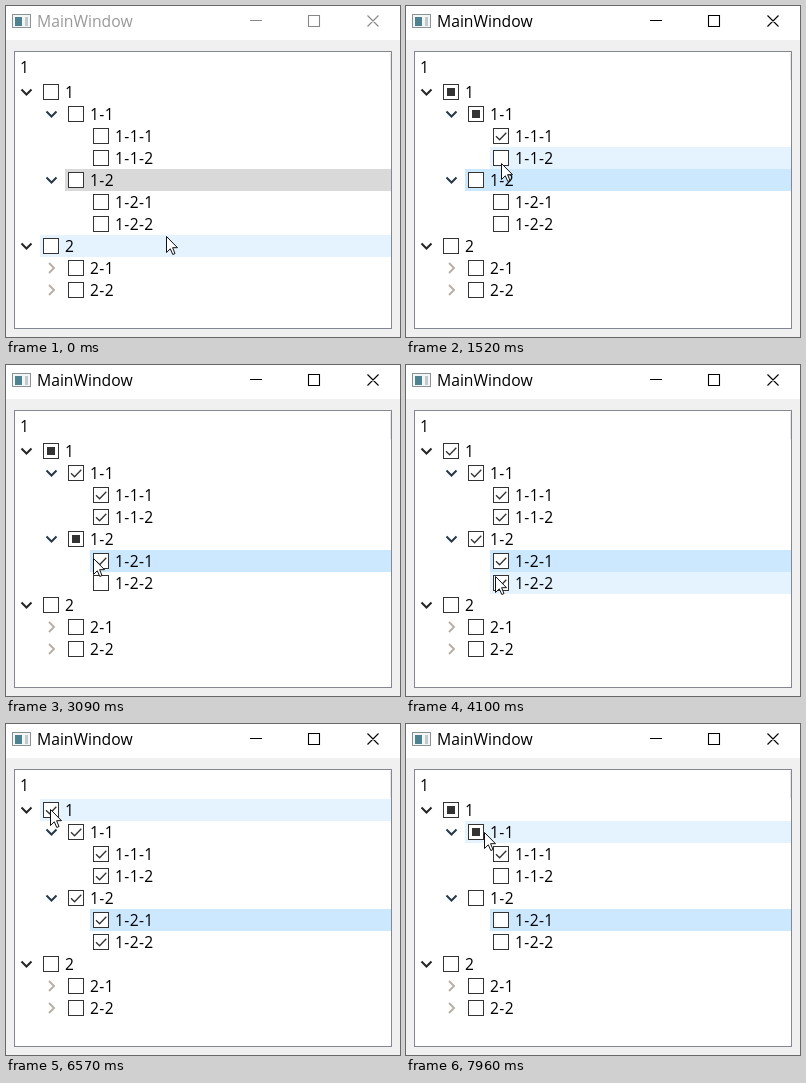
An HTML page that plays this animation: 394x331 px, repeating every 8 s.

```html
<!DOCTYPE html>
<html lang="en">
<head>
<meta charset="utf-8">
<title>Tree view</title>
<style>
html, body { margin: 0; width: 100%; height: 100%; overflow: hidden; }
svg { display: block; }
text { font-family: "Open Sans", "Noto Sans", sans-serif; white-space: pre; }
.label { font-size: 15.6px; letter-spacing: .35px; fill: #000; }
.line { fill: none; }
</style>
</head>
<body>
<svg id="stage" width="394" height="331" viewBox="0 0 394 331"></svg>
<script>
const LOOP = 8000, STEP = 76, TOP = 75, ROW = 22, INDENT = 25;
const ACTIVATED = 890, RESELECTED = 3090;
const stage = document.getElementById('stage');

const names = '1 1-1 1-1-1 1-1-2 1-2 1-2-1 1-2-2 2 2-1 2-2'.split(' ');
const depthOf = name => name.split('-').length - 1;
const isBelow = (name, parent) => name.startsWith(parent + '-');
const boxOf = name => ({
  x: 37 + depthOf(name) * INDENT,
  mid: TOP + (names.indexOf(name) + .5) * ROW
});

const glides = [], clicks = [];

// Pointer heads for a spot near the row's checkbox in whole picture steps
function glide(at, steps, name, dx = 8, dy = 2) {
  const { x, mid } = boxOf(name);
  glides.push({ at, steps, x: x + dx, y: mid + dy });
}
const click = (at, name) => clicks.push({ at, name });

glide(360, 6, '1-1-1', 8, 5);
click(1060, '1-1-1');
glide(1210, 2, '1-1-2', 8, 5);
click(1590, '1-1-2');
glide(1840, 5, '1-1', 10, 2);
glide(2460, 3, '1-2-1', 0, -3);
click(3090, '1-2-1');
glide(3170, 3, '1-2-2', 8, 5);
click(3590, '1-2-2');
glide(4100, 6, '1-2');
click(4650, '1-2');
glide(4800, 6, '1-1-1', -15, -11);
glide(5350, 2, '1-1');
click(5640, '1-1');
glide(5720, 5, '1', 7, -1);
click(6260, '1');
click(6870, '1');
glide(7040, 7, '1-1-1');
click(7580, '1-1-1');
glide(7810, 3, '1-1', 16, 0);

function add(tag, attrs) {
  const node = document.createElementNS('http://www.w3.org/2000/svg', tag);
  for (const key in attrs) node.setAttribute(key, attrs[key]);
  return stage.appendChild(node);
}
const rect = (x, y, width, height, fill, stroke = 'none') =>
  add('rect', { x, y, width, height, fill, stroke });
const path = (d, stroke, width) =>
  add('path', { d, stroke, 'stroke-width': width, class: 'line' });
function label(x, y, value, attrs = { class: 'label' }) {
  const node = add('text', { x, y, ...attrs });
  node.textContent = value;
  return node;
}
const show = (node, on) => node.setAttribute('visibility', on ? 'visible' : 'hidden');

rect(0, 0, 394, 331, '#f0f0f0');
rect(0, 0, 394, 34, '#fff');

// Window icon
rect(6.5, 8.5, 18, 13, '#f4f6f6', '#8a9295');
rect(9, 11, 7, 9, '#4f8290');
rect(19, 11, 3, 9, '#c3c9cb');

const title = label(31, 21, 'MainWindow', { 'font-size': '15.7px' });
const buttons = path('M244 14.5h12M302.5 9.5h11v11h-11zM361.5 9.5l11 11m0-11l-11 11', '#000', 1.1);

rect(8.5, 45.5, 377, 277, '#fff', '#828790');
rect(384, 47, 1, 27, '#e5e5e5');
label(14, 67, '1');

function drawRow(name) {
  const { x, mid } = boxOf(name);
  const depth = depthOf(name);
  const back = rect(x - 3, mid - ROW / 2, 388 - x, ROW, 'none');
  if (names.some(other => isBelow(other, name)))
    path(`M${x - 21.5} ${mid - 2.5}l5 5 5-5`, depth ? '#26394a' : '#262626', 2);
  else if (depth < 2)
    path(`M${x - 19} ${mid - 5}l5 5-5 5`, '#b8aea4', 1.9);
  rect(x + .5, mid - 7.5, 15, 15, '#fff', '#333');
  const tick = path(`M${x + 3} ${mid + .2}l3.6 3.6 6.7-7`, '#333', 1.3);
  const partial = rect(x + 4, mid - 4, 8, 8, '#333');
  label(x + 22, mid + 5.5, name);
  return { name, back, tick, partial };
}
const rows = names.map(drawRow);
const leaves = names.filter(name => depthOf(name) === 2);

const pointer = add('path', {
  d: 'M.5 .5V16.5L4.3 12.8 6.8 18.5 9 17.5 6.6 11.7H11.5Z',
  fill: '#fff', stroke: '#111', 'stroke-width': 1
});

const easeOut = p => 1 - (1 - p) ** 1.6;

function pointerAt(t) {
  let x = 160, y = 230;
  for (const move of glides) {
    if (t < move.at) break;
    const done = Math.floor((t - move.at) / STEP + 1.02);
    const part = easeOut(Math.min(1, done / move.steps));
    x += (move.x - x) * part;
    y += (move.y - y) * part;
  }
  return [Math.round(x), Math.round(y)];
}

const leavesOf = name => leaves.filter(leaf => leaf === name || isBelow(leaf, name));

function checkedAt(t) {
  const checked = new Set();
  for (const { at, name } of clicks) {
    if (t < at) break;
    const group = leavesOf(name);
    const full = group.every(leaf => checked.has(leaf));
    group.forEach(leaf => full ? checked.delete(leaf) : checked.add(leaf));
  }
  return checked;
}

function render(t) {
  const [x, y] = pointerAt(t);
  const active = t >= ACTIVATED;
  const hovered = names[Math.floor((y - TOP) / ROW)];
  const selected = t < RESELECTED ? '1-2' : '1-2-1';
  const checked = checkedAt(t);

  title.setAttribute('fill', active ? '#000' : '#999');
  buttons.setAttribute('stroke', active ? '#000' : '#888');
  for (const { name, back, tick, partial } of rows) {
    const group = leavesOf(name);
    const count = group.filter(leaf => checked.has(leaf)).length;
    show(tick, count > 0 && count === group.length);
    show(partial, count > 0 && count < group.length);
    back.setAttribute('fill',
      name === selected ? (active ? '#cce8ff' : '#d9d9d9') :
      name === hovered ? '#e5f3ff' : 'none');
  }
  pointer.setAttribute('transform', `translate(${x} ${y})`);
}

const began = performance.now();
function frame() {
  render((performance.now() - began) % LOOP);
  requestAnimationFrame(frame);
}
frame();
</script>
</body>
</html>
```
